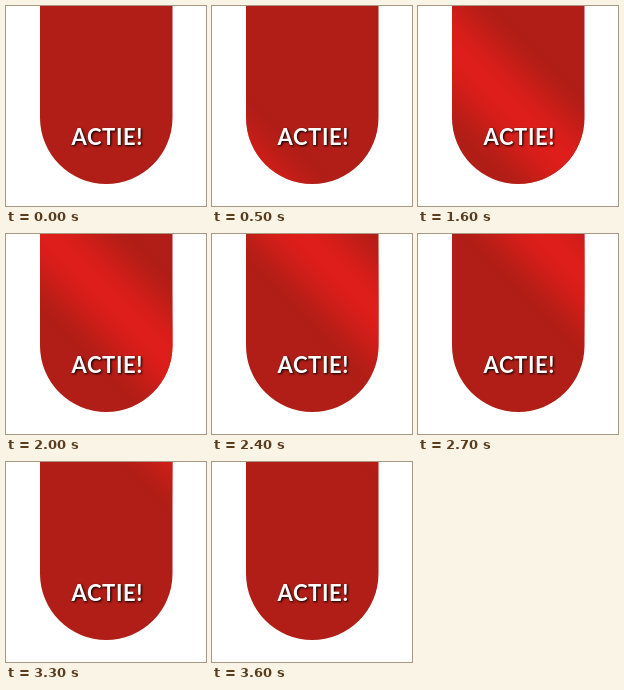
An HTML page for the animation above (4.2 s loop, 200 px wide and 200 px high).

```html
<!DOCTYPE html>
<html lang="nl">
<head>
<meta charset="utf-8">
<title>Actie</title>
<style>
  html, body { margin: 0; width: 100%; height: 100%; overflow: hidden; background: #fff; }
  svg { display: block; width: 100%; height: 100%; }
  text {
    font: 700 22px Lato, sans-serif;
    letter-spacing: .6px;
    text-anchor: middle;
    fill: #fff;
    filter: drop-shadow(1px 1px 1px #000);
  }
  #glow stop { stop-color: #de1e1a; }
</style>
</head>
<body>
<svg viewBox="0 0 200 200">
  <defs>
    <clipPath id="label">
      <path d="M34 0H166.5V111.75A66.25 66.25 0 0 1 34 111.75Z"/>
    </clipPath>
    <linearGradient id="glow" gradientUnits="userSpaceOnUse" x1="-45" y1="45" x2="45" y2="-45"></linearGradient>
  </defs>
  <g clip-path="url(#label)">
    <rect width="200" height="200" fill="#b01e17"/>
    <rect id="shine" x="-500" width="1000" height="200" fill="url(#glow)"/>
  </g>
  <text x="101.3" y="138.7">ACTIE!</text>
</svg>
<script>
  const LOOP = 4200;
  const SPEED = 0.12;
  const STOPS = 16;
  const shineX = t => 160 + SPEED * (t - 3000);

  // Soft bell-shaped falloff on both sides of the shine.
  const glow = document.getElementById('glow');
  for (let i = 0; i <= STOPS; i++) {
    const stop = document.createElementNS(glow.namespaceURI, 'stop');
    stop.setAttribute('offset', i / STOPS);
    stop.setAttribute('stop-opacity', (1 - Math.cos(2 * Math.PI * i / STOPS)) / 2);
    glow.append(stop);
  }

  // Quick steps while the shine crosses, slower ones as it leaves.
  const times = [0];
  for (let t = 400; t < 2400; t += 100) times.push(t);
  for (let t = 2400; t <= 3600; t += 300) times.push(t);
  times.push(LOOP);

  const frames = times.map(t => ({
    offset: t / LOOP,
    transform: `translateX(${shineX(t)}px)`,
    easing: 'step-end'
  }));

  document.getElementById('shine').animate(frames, { duration: LOOP, iterations: Infinity });
</script>
</body>
</html>
```
